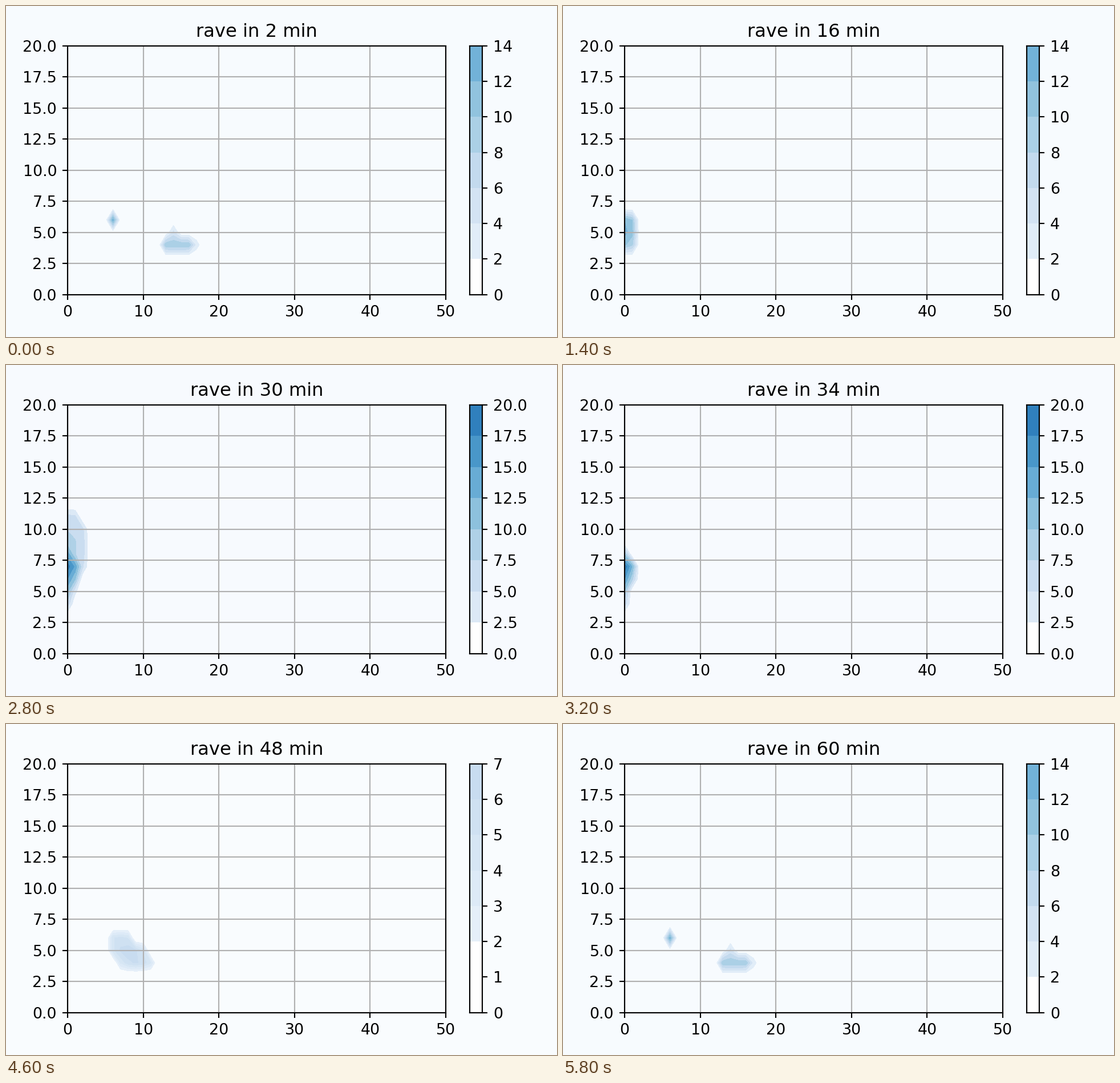
A matplotlib script for the animation above (6000 ms loop, 966x580 px).

```python
import numpy as np
import matplotlib.pyplot as plt
from matplotlib.animation import FuncAnimation
from matplotlib.ticker import MaxNLocator

W, H = 966, 580
DPI = W / 5
NX, NY = 51, 21
FRAMES, STEP_MS = 30, 200
VMAX = 27
SPEED = 2   # grid cells per step while the shower drifts to the wall

plt.rcParams["font.family"] = "DejaVu Sans"
blues = plt.get_cmap("Blues")
X, Y = np.meshgrid(np.arange(NX), np.arange(NY))


def blob(cx, cy, peak, rx=0.5, ry=0.5, droop=0.4, lean=0):
    """Hard-edged ellipse of rain that weakens away from its centre."""
    dy = Y - cy
    r2 = ((X - cx - lean * dy) / rx) ** 2 + (dy / ry) ** 2
    return np.where(r2 < 1, peak * (1 - droop * r2), 0)


def drift(z, n):
    """Move the grid n cells to the right, filling with zeros."""
    if n < 0:
        return np.pad(z, ((0, 0), (0, -n)))[:, -n:]
    return np.pad(z, ((0, 0), (n, 0)))[:, :NX]


EMPTY = np.zeros((NY, NX))
SPOTS = (blob(6, 6, 13) + blob(14.5, 4, 9.99, 1.6, 0.9, 0.02)
         + blob(14, 5, 4.6) + blob(17, 4, 3.3))
WALL = blob(0, 5.25, 12.8, 1.5, 1.7, 0.35)
TALL = np.maximum(blob(0, 8.55, 20.4, 2.5, 2.8, 0.35),
                  blob(0, 5.2, 12, 1.3, 1.3, 0.55))
SHORT = np.maximum(blob(0, 6.8, 19.6, 1.3, 1.3, 0.6),
                   blob(0, 4.8, 10, 0.95, 0.95, 0.5))
CLOUD = blob(8.2, 4.8, 13.5, 2.3, 1.7, lean=-1)

KEYS = [(0, SPOTS), (7, WALL), (11, TALL), (16, SHORT),
        (18, EMPTY), (21, EMPTY), (25, CLOUD), (29, SPOTS)]


def rain(k):
    for (t0, a), (t1, b) in zip(KEYS, KEYS[1:]):
        if k <= t1:
            break
    if t0 == 0:
        a, b = drift(a, -SPEED * k), drift(b, SPEED * (t1 - k))
    u = (k - t0) / (t1 - t0)
    z = (1 - u) * a + u * b
    z[10, 25] = 1.9   # drizzle too weak to show
    return z


def band_levels(top):
    lv = MaxNLocator(8, min_n_ticks=1).tick_values(0, top)
    return lv[:np.searchsorted(lv, top) + 1]


def place(x0, x1, y0=70, y1=505.6):
    return fig.add_axes([x0 / W, 1 - y1 / H, (x1 - x0) / W, (y1 - y0) / H])


fig = plt.figure(figsize=(W / DPI, H / DPI), dpi=DPI)
ax = place(108, 771)
cax = place(813, 835)


def draw(k):
    z = rain(k)
    levels = band_levels(z.max())
    mids = (levels[:-1] + levels[1:]) / 2
    base = (1 + np.array(blues(mids[0] / VMAX)[:3])) / 2
    shades = [blues(m / VMAX) if m >= 2 else None for m in mids]

    fig.set_facecolor(base)
    ax.clear()
    ax.set_facecolor(base)
    ax.contourf(z, levels=levels,
                colors=[tuple(base) if s is None else s for s in shades])
    ax.set(xlim=(0, 50), ylim=(0, 20), yticks=np.arange(0, 21, 2.5))
    ax.grid(True)
    ax.set_title(f"rave in {2 * k + 2} min")

    cax.clear()
    for lo, hi, s in zip(levels, levels[1:], shades):
        cax.axhspan(lo, hi, fc=s or "white", ec="none", aa=False)
    cax.set(xlim=(0, 1), ylim=(0, levels[-1]), xticks=[])
    cax.yaxis.tick_right()
    cax.set_yticks(levels)


anim = FuncAnimation(fig, draw, frames=FRAMES, interval=STEP_MS,
                     repeat=True, repeat_delay=0)
plt.show()
```
